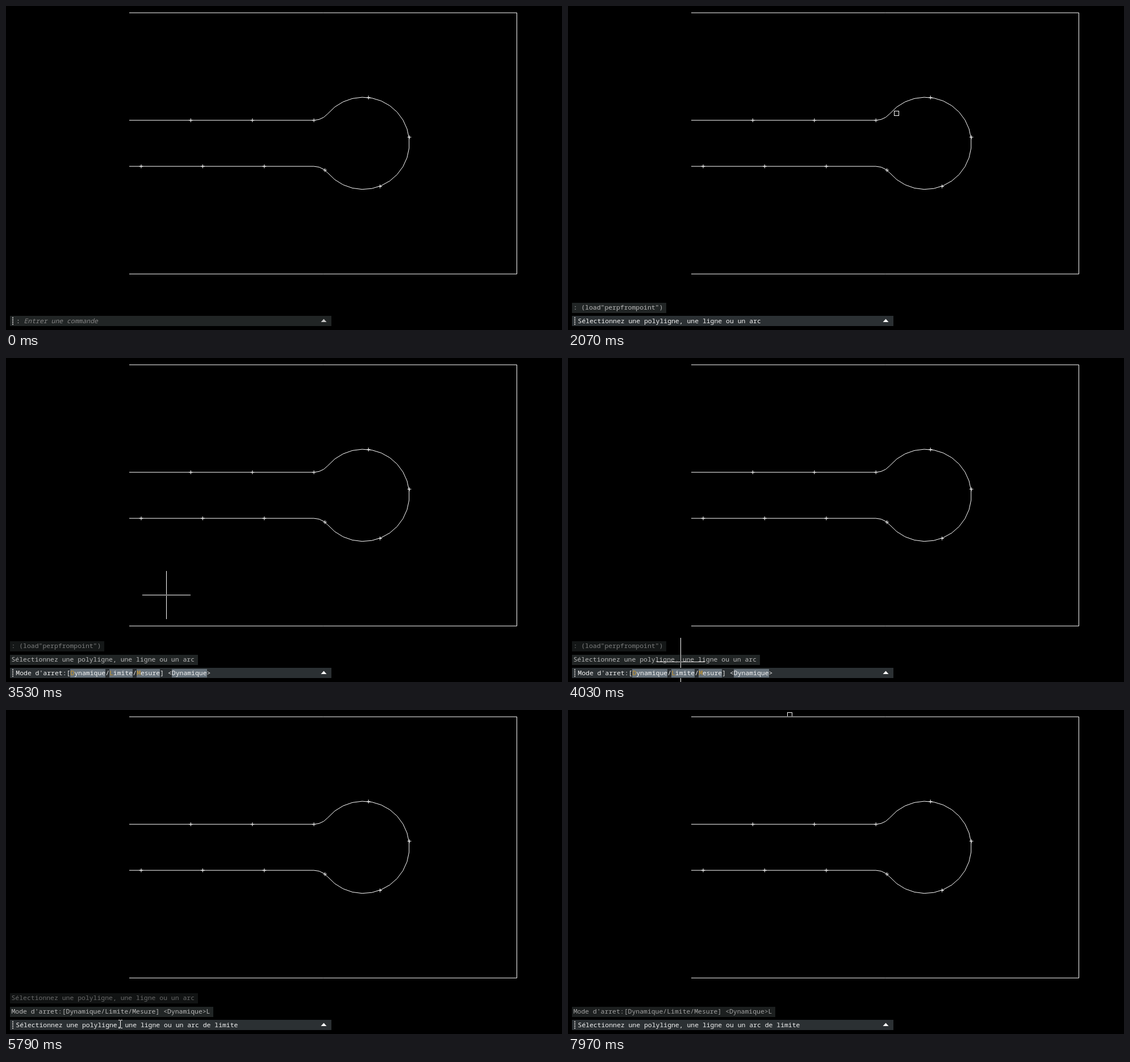
An HTML page with a canvas for the animation above (8 s loop, 979 by 572 pixels).

```html
<!DOCTYPE html>
<html lang="fr">
<head>
<meta charset="utf-8">
<title>Perpendiculaire</title>
<style>
html, body { margin: 0; width: 100%; height: 100%; overflow: hidden; background: #000; }
canvas { display: block; }
</style>
</head>
<body>
<canvas id="stage" width="979" height="572"></canvas>
<script>
const ctx = document.getElementById('stage').getContext('2d');
const LOOP = 8000;
const CHAR = 6.87;
const FONT = '11.45px "Noto Sans Mono", monospace';
const LOAD = ': (load"perpfrompoint")';
const SELECT = 'Sélectionnez une polyligne, une ligne ou un arc';
const MODE = "Mode d'arret:[Dynamique/Limite/Mesure] <Dynamique>";

// Value of the last [time, value] pair reached.
function step(t, pairs) {
  let value = pairs[0][1];
  for (const [time, v] of pairs) if (t >= time) value = v;
  return value;
}

// Keys are [time, x, y, easing] with the easing leading to that key.
const linear = u => u;
const easeOut = u => 1 - Math.pow(1 - u, 1.8);
const easeIn = u => Math.pow(u, 1.2);
const slowing = u => u * (1.25 - 0.25 * u);

function follow(t, keys) {
  let [t0, x0, y0] = keys[0];
  for (const [t1, x1, y1, ease = linear] of keys.slice(1)) {
    if (t < t1) {
      const u = ease(Math.max(0, (t - t0) / (t1 - t0)));
      return [Math.round(x0 + (x1 - x0) * u), Math.round(y0 + (y1 - y0) * u)];
    }
    [t0, x0, y0] = [t1, x1, y1];
  }
  return [x0, y0];
}

const PICK_PATH = [[1600, 961, 150], [2390, 485, 198, easeOut], [2420, 485, 199],
  [2680, 485, 199], [2681, 485, 200], [2740, 485, 200], [2741, 485, 201]];
const CROSS_PATH = [[3150, 485, 201], [3530, 282, 418, slowing],
  [3940, 195, 523, easeOut], [4270, 201, 553, easeOut]];
const LIMIT_PATH = [[6570, 201, 553], [7360, 393, 264, easeIn],
  [7600, 401, 150], [7970, 390, 8, easeOut]];

// Road of half width HALF along AXIS, ending in a round turning area.
const LEFT = 217, AXIS = 242.4, HALF = 40.65, SPACING = 108.4;

function bulbOutline() {
  const cx = 628.9, r = 81.3, fillet = 32, x = 541.9;
  const rad = Math.PI / 180;
  const top = [[LEFT, AXIS - HALF]];
  for (let i = 0; i < 3; i++) {
    const a = i * 50 / 3 * rad;
    top.push([x + fillet * Math.sin(a), AXIS - HALF - fillet * (1 - Math.cos(a))]);
  }
  for (let i = 0; i < 12; i++) {
    const a = (140 - i * 280 / 23) * rad;
    top.push([cx + r * Math.cos(a), AXIS - r * Math.sin(a)]);
  }
  const bottom = top.map(([px, py]) => [px, 2 * AXIS - py]).reverse();
  return [...top, ...bottom];
}

const BULB = bulbOutline();
const FRAME = [[LEFT, 12], [899.5, 12], [899.5, 473.1], [LEFT, 473.1]];
const MARKS = [[638.2, 161.6], [710.2, 231.6], [658.6, 318.5], [561.6, 289.8]];
for (let i = 0; i < 3; i++) {
  MARKS.push([LEFT + SPACING * (i + 1), AXIS - HALF], [238 + SPACING * i, AXIS + HALF]);
}

function polyline(points) {
  ctx.beginPath();
  points.forEach(([x, y]) => ctx.lineTo(x, y));
  ctx.stroke();
}

function rect(x, y, w, h, color) {
  ctx.fillStyle = color;
  ctx.fillRect(x, y, w, h);
}

function drawing() {
  ctx.strokeStyle = '#fff';
  ctx.lineWidth = 1;
  polyline(FRAME);
  polyline(BULB);
  for (const [x, y] of MARKS) {
    polyline([[x - 3.3, y], [x + 3.3, y]]);
    polyline([[x, y - 3.3], [x, y + 3.3]]);
  }
}

// Cursors invert what lies under them.
function inverted(draw) {
  ctx.globalCompositeOperation = 'difference';
  draw();
  ctx.globalCompositeOperation = 'source-over';
}

function pickBox([x, y]) {
  inverted(() => {
    ctx.strokeStyle = '#fff';
    ctx.strokeRect(x - 3.5, y - 3.5, 8, 8);
  });
}

function crosshair([x, y]) {
  inverted(() => {
    rect(x, y - 42, 1, 85, '#fff');
    rect(x - 42, y, 85, 1, '#fff');
  });
}

function text(str, x, y, color, style = '') {
  ctx.font = style + FONT;
  ctx.fillStyle = color;
  ctx.fillText(str, x, y);
}

function historyLine(str, top, textAlpha, boxAlpha = textAlpha) {
  ctx.globalAlpha = boxAlpha;
  rect(7, top, Math.round(8 + str.length * CHAR), 18, '#212525');
  ctx.globalAlpha = textAlpha;
  text(str, 9.5, top + 12, '#b8b8b8');
  ctx.globalAlpha = 1;
}

function history(t) {
  if (t < 910) return;
  if (t < 3000) {
    historyLine(LOAD, 524, 1);
  } else if (t < 5430) {
    const fade = step(t, [[3000, 0.63], [4410, 0.45], [4590, 0.3], [4680, 0.15], [4860, 0]]);
    historyLine(LOAD, 500, fade, Math.max(fade, 0.06));
    historyLine(SELECT, 524, step(t, [[3000, 1], [5070, 0.92], [5160, 0.85]]));
  } else {
    const fade = step(t, [[5430, 0.6], [5700, 0.52], [5880, 0.44], [6090, 0.36],
      [6270, 0.29], [6330, 0.23], [6390, 0.18], [6660, 0.1], [6840, 0]]);
    historyLine(SELECT, 500, fade);
    historyLine(MODE + 'L', 524, step(t, [[5430, 1], [7000, 0.93], [7300, 0.86]]));
  }
}

function modePrompt() {
  const at = i => 17.3 + i * CHAR;
  const options = [[14, 9], [24, 6], [31, 6], [40, 9]];
  for (const [i, n] of options) rect(Math.round(at(i)), 549, Math.round(n * CHAR), 15, '#66717a');
  text(MODE, at(0), 560, '#f2f2f2');
  for (const [i] of options.slice(0, 3)) {
    rect(Math.round(at(i)), 549, Math.round(CHAR), 15, '#66717a');
    text(MODE[i], at(i), 560, '#c9962a');
  }
}

function commandBar(t) {
  const idle = t < 770;
  rect(7, 547, 566, 18, idle ? '#212525' : '#2b3033');
  for (let y = 549; y < 564; y += 3) rect(11, y, 2, 2, '#b0b0b0');
  ctx.fillStyle = idle ? '#c4c4c4' : '#fff';
  ctx.beginPath();
  ctx.moveTo(554.5, 558);
  ctx.lineTo(559.5, 552.5);
  ctx.lineTo(564.5, 558);
  ctx.fill();

  if (idle) {
    text(':', 18, 560, '#d0d0d0');
    text('Entrer une commande', 31.5, 560, '#858585', 'italic ');
  } else if (t < 910) {
    text(LOAD, 17.3, 560, '#f2f2f2');
  } else if (t < 2940) {
    text(SELECT, 17.3, 560, '#f2f2f2');
  } else if (t < 5430) {
    modePrompt();
  } else {
    text(SELECT + ' de limite', 17.3, 560, '#f2f2f2');
  }
}

function hand([x, y]) {
  ctx.save();
  ctx.translate(x, y);
  ctx.beginPath();
  ctx.moveTo(-2, 1);
  ctx.quadraticCurveTo(0, -1, 2, 1);
  ctx.lineTo(2, 6);
  ctx.lineTo(8, 7.5);
  ctx.quadraticCurveTo(9.5, 8, 9.5, 10);
  ctx.lineTo(9, 15);
  ctx.lineTo(7, 20);
  ctx.lineTo(-1, 20);
  ctx.lineTo(-5.5, 12);
  ctx.quadraticCurveTo(-5, 9, -2, 11);
  ctx.closePath();
  ctx.fillStyle = '#fff';
  ctx.fill();
  ctx.strokeStyle = '#111';
  ctx.stroke();
  ctx.restore();
}

function textCursor([x, y]) {
  rect(x, y - 5, 1, 13, '#fff');
  for (const end of [y - 6, y + 8]) {
    rect(x - 3, end, 3, 1, '#fff');
    rect(x + 1, end, 3, 1, '#fff');
  }
}

function render(t) {
  rect(0, 0, 979, 572, '#000');
  drawing();
  history(t);

  const picking = t >= 1600 && t < 2920;
  const aiming = t >= 2920 && t < 5430;
  const limiting = t >= 5430;
  const aim = follow(t, CROSS_PATH);
  const limit = follow(t, LIMIT_PATH);

  if (picking) pickBox(follow(t, PICK_PATH));
  if (aiming) crosshair(aim[1] > 546 ? [197, 546] : aim);
  if (limiting && limit[1] <= 546) pickBox(limit);

  commandBar(t);
  if (aiming && aim[1] > 546) {
    if (t >= 4590 && t < 5070) rect(196, 549, 6, 7, '#1673c8');
    hand(aim);
  }
  if (limiting && limit[1] > 546) textCursor(limit);
}

const start = performance.now();
function tick() {
  render((performance.now() - start) % LOOP);
  requestAnimationFrame(tick);
}
tick();
</script>
</body>
</html>
```
